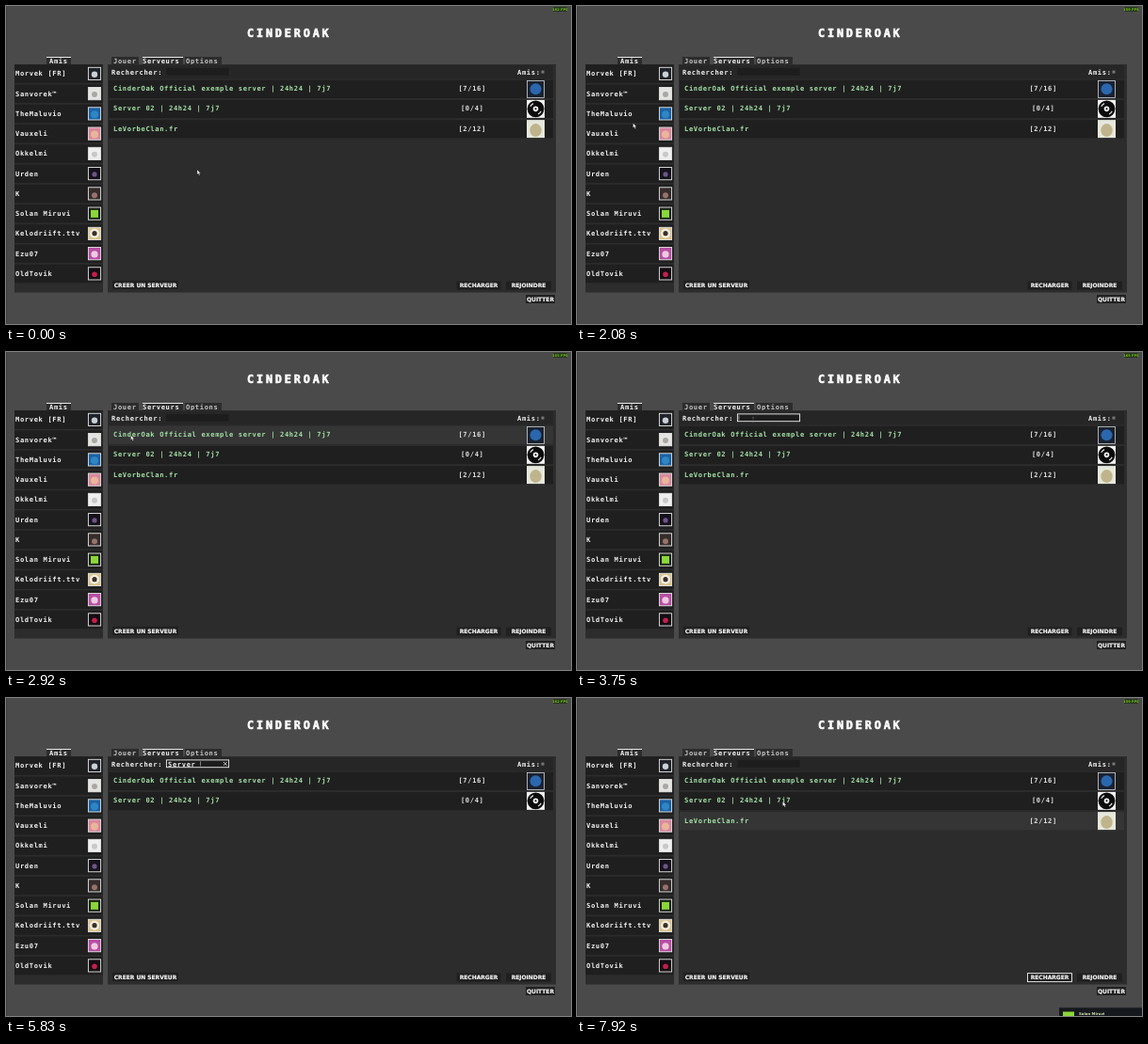
Recreate the animation shown at these times as an HTML page. Size 600 by 338 pixels, loop 8000 ms.

```html
<!DOCTYPE html>
<html lang="fr">
<head>
<meta charset="utf-8">
<title>Liste des serveurs</title>
<style>
html, body { margin: 0; width: 600px; height: 338px; overflow: hidden; background: #4a4a4a; }
svg { display: block; }
text { white-space: pre; }
.mono { font-family: "DejaVu Sans Mono", monospace; font-weight: bold; }
.wide { font-family: "DejaVu Sans", sans-serif; font-weight: bold; }
</style>
</head>
<body>
<svg id="stage" width="600" height="338" viewBox="0 0 600 338"></svg>
<script>
const LOOP = 8000;
const STEP = 4.92;      // advance of one character in the small type
const PITCH = 21.25;    // distance between list rows
const ROW = '#1f1f1f', ROW_HOVER = '#353535';
const stage = document.getElementById('stage');

function add(parent, tag, attrs, content) {
  const el = document.createElementNS('http://www.w3.org/2000/svg', tag);
  for (const key in attrs) el.setAttribute(key, attrs[key]);
  if (content !== undefined) el.textContent = content;
  parent.appendChild(el);
  return el;
}
const group = (parent = stage) => add(parent, 'g', {});
const rect = (p, x, y, width, height, fill, more) =>
  add(p, 'rect', { x, y, width, height, fill, ...more });
const circle = (p, cx, cy, r, fill) => add(p, 'circle', { cx, cy, r, fill });

// Text is placed by the vertical centre of its capitals.
function label(p, x, y, content, fill = '#f2f2f2') {
  const size = 7.1;
  return add(p, 'text', {
    class: 'mono', x, y: y + size * 0.36, fill, 'font-size': size,
    'letter-spacing': STEP - size * 0.602
  }, content);
}

function button(x, y, w, name) {
  const box = rect(stage, x, y, w, 9, '#202020');
  add(stage, 'text', {
    class: 'wide', x: x + w / 2, y: y + 6.7, fill: '#f4f4f4', stroke: '#f4f4f4',
    'stroke-width': 0.2, 'font-size': 5.95, 'text-anchor': 'middle'
  }, name);
  return box;
}

function tab(x, w, name, textX, active) {
  rect(stage, x, 54, w, 8, '#2c2c2c');
  if (active) rect(stage, x, 54, w, 1, '#e8e8e8');
  label(stage, textX, 58.2, name, active ? '#f2f2f2' : '#c4c4c4');
}

function show(el, on) {
  el.setAttribute('visibility', on ? 'visible' : 'hidden');
}

// Page
rect(stage, 0, 0, 600, 338, '#4a4a4a');
rect(stage, 0, 0, 0.7, 338, '#3a3a3a');
add(stage, 'text', {
  class: 'mono', x: 256, y: 33.4, fill: '#fff', stroke: '#fff', 'stroke-width': 0.6,
  'font-size': 11.8, 'letter-spacing': 2.85
}, 'CINDEROAK');

rect(stage, 581.5, 1, 14, 5, '#25351a');
const fps = add(stage, 'text', {
  class: 'wide', x: 588.5, y: 4.9, fill: '#74c41c', 'font-size': 3.6, 'text-anchor': 'middle'
});

// Friends
tab(43, 26, 'Amis', 46, true);
rect(stage, 9, 62, 94, 242.5, '#2c2c2c');

// name, backdrop, figure colour, figure radius, figure offset
const friends = [
  ['Morvek [FR]', '#20242a', '#c9d0d6', 3.2, 1],
  ['Sanvorek™', '#e4e4e2', '#a9a7a4', 3, 1],
  ['TheMaluvio', '#1b62a4', '#2f86c4', 4, 1],
  ['Vauxeli', '#d8889e', '#e9b69a', 4, 1],
  ['Okkelmi', '#efefef', '#c8c8c8', 3, 1],
  ['Urden', '#15121b', '#6d5585', 2.6, 1],
  ['K', '#352d2c', '#96736c', 3, 2],
  ['Solan Miruvi', '#17200f', '#8bd63a', 0, 0],
  ['Kelodriift.ttv', '#dcc48a', '#f3efe6', 5, 0],
  ['Ezu07', '#b84ea4', '#efcbe0', 3.6, 1],
  ['OldTovik', '#140d13', '#c31f4b', 2.8, 1]
];

const friendRows = friends.map(([name, back, tone, r, dy], i) => {
  const y = 71.7 + i * PITCH;
  const box = rect(stage, 9, y - 9.5, 93.5, 19.6, ROW);
  label(stage, 10, y, name);
  rect(stage, 87.4, y - 6.4, 13.2, 13.2, back, { stroke: '#e6e6e6', 'stroke-width': 0.9 });
  if (r) circle(stage, 94, y + dy, r, tone);
  else rect(stage, 90, y - 3.6, 8, 8, tone);
  if (name.endsWith('.ttv')) circle(stage, 94, y, 2.6, '#3a3025');
  return { box, y };
});

// Server panel
tab(112, 29, 'Jouer', 114);
tab(145, 43, 'Serveurs', 145, true);
tab(190, 39, 'Options', 191);
rect(stage, 108, 62, 476, 242.5, '#2c2c2c');
rect(stage, 109, 63, 472, 14.5, '#262626');
label(stage, 112, 70, 'Rechercher:');
label(stage, 543, 70, 'Amis:');
rect(stage, 568.5, 68.6, 3, 3, '#777');

const field = rect(stage, 170.4, 65.9, 66.2, 7.8, '#1d1d1d', { 'stroke-width': 0.9 });
const query = label(stage, 172, 70, '');
const clear = add(stage, 'path', {
  d: 'M231 68l3.6 3.8M234.6 68l-3.6 3.8', stroke: '#e4e4e4', 'stroke-width': 0.8
});
const caret = rect(stage, 0, 67.4, 0.7, 5, '#b0b0b0');

function emblem(g) {
  rect(g, 553.5, -8.6, 18, 18, '#1a2230', { stroke: '#cfd3d8', 'stroke-width': 0.8 });
  circle(g, 562.5, 0.2, 6, '#2b67ae');
}
function disc(g) {
  rect(g, 553, -9.4, 19, 19, '#f4f4f4');
  circle(g, 562.5, 0.1, 8.9, '#0b0b0b');
  add(g, 'path', {
    d: 'M556.8 -2.4A6.2 6.2 0 0 1 560 -5.6M568.2 2.6A6.2 6.2 0 0 1 565 5.8',
    stroke: '#e4e4e4', 'stroke-width': 1.2, fill: 'none'
  });
  circle(g, 562.5, 0.1, 2.8, '#f4f4f4');
  circle(g, 562.5, 0.1, 1, '#0b0b0b');
}
function portrait(g) {
  rect(g, 553, -9.4, 19, 19, '#e6e8dc');
  add(g, 'ellipse', { cx: 562.5, cy: 1.6, rx: 6.2, ry: 7, fill: '#bfb48c' });
}

const servers = [
  ['CinderOak Official exemple server | 24h24 | 7j7', '[7/16]', emblem],
  ['Server 02 | 24h24 | 7j7', '[0/4]', disc],
  ['LeVorbeClan.fr', '[2/12]', portrait]
].map(([name, count, icon]) => {
  const g = group();
  const box = rect(g, 109, -9.3, 472, 19.2, ROW);
  label(g, 114, -0.4, name, '#a5e2a8');
  label(g, 495.2 - count.length * STEP / 2, -0.4, count, '#e2e2e2');
  icon(g);
  return { name: name.toLowerCase(), g, box };
});

button(113, 291.8, 70, 'CREER UN SERVEUR');
const reload = button(478.5, 292.6, 47, 'RECHARGER');
button(531, 292.6, 48, 'REJOINDRE');
button(552, 307, 31, 'QUITTER');

// Friend notification
const toast = group();
rect(toast, 512, 0, 88, 30, '#15181c');
rect(toast, 512, 0, 88, 0.5, '#30353b');
rect(toast, 516, 4.5, 12, 12, '#8bd63a');
add(toast, 'text', { class: 'wide', x: 533, y: 7.6, fill: '#d5e6b4', 'font-size': 3.9 }, 'Solan Miruvi');

// Pointers
const arrow = add(stage, 'path', {
  d: 'M0 0V5L1.2 4L2.1 6L3 5.6L2.2 3.7H3.7Z',
  fill: '#fff', stroke: '#222', 'stroke-width': 0.35
});
const beam = add(stage, 'path', {
  d: 'M-1 -2.6H1M0 -2.6V2.6M-1 2.6H1', stroke: '#6a6a6a', 'stroke-width': 0.5
});

// time, x, y
const path = [
  [0, 203, 174], [250, 150, 215], [520, 76, 270], [830, 60, 283],
  [1250, 57, 280], [1640, 60, 190], [1960, 59.5, 124.6], [2090, 59.5, 124.6],
  [2450, 72, 92], [2920, 132.5, 88.5], [3350, 187, 71], [6800, 187, 71],
  [7330, 487, 285.5], [7460, 500, 295], [7600, 498, 294], [7920, 218.5, 110],
  [8000, 208, 107]
];
const TYPED = 'Server 02';
const keys = [4170, 4330, 4500, 4830, 5080, 5330, 5580, 6170, 6420];
const FOCUS = 3540, HOVER = 7440, CLICK = 7500;
const LAG = 65;         // the row highlight trails the pointer

function pointerAt(t) {
  const i = Math.max(1, path.findIndex(p => p[0] > t));
  const [a, b] = [path[i - 1], path[i]];
  const u = (t - a[0]) / (b[0] - a[0]);
  const s = u * u * (3 - 2 * u);
  return [a[1] + (b[1] - a[1]) * s, a[2] + (b[2] - a[2]) * s];
}

function highlight(box, y, left, right, [px, py]) {
  const over = px > left && px < right && py > y - 9.4 && py < y + 10;
  box.setAttribute('fill', over ? ROW_HOVER : ROW);
}

function draw(t) {
  const active = t >= FOCUS && t < CLICK;
  const text = active ? TYPED.slice(0, keys.filter(k => k <= t).length) : '';
  query.textContent = text;
  field.setAttribute('stroke', active ? '#f0f0f0' : 'none');
  show(clear, text);
  show(caret, active && t % 1000 >= 500);
  caret.setAttribute('x', 171.6 + text.length * STEP);

  const trail = pointerAt(Math.max(0, t - LAG));
  for (const { box, y } of friendRows) highlight(box, y, 9, 102.5, trail);

  let row = 0;
  for (const { name, g, box } of servers) {
    const match = name.includes(text.toLowerCase());
    show(g, match);
    if (!match) continue;
    const y = 88 + PITCH * row++;
    g.setAttribute('transform', `translate(0 ${y})`);
    highlight(box, y, 109, 581, trail);
  }

  reload.setAttribute('stroke', t >= HOVER ? '#f0f0f0' : 'none');
  reload.setAttribute('stroke-width', 0.9);

  const [x, y] = pointerAt(t);
  const overField = x > 170 && x < 237 && y > 66 && y < 75;
  show(arrow, !overField);
  show(beam, overField && !text);
  arrow.setAttribute('transform', `translate(${x} ${y})`);
  beam.setAttribute('transform', `translate(${x} ${y + 1})`);

  show(toast, t >= 7740);
  toast.setAttribute('transform', `translate(0 ${338 - (t - 7740) * 0.05})`);

  const beat = Math.floor(t / 250);
  fps.textContent = 150 + (beat * 37 + 12) % 23 + ' FPS';
}

function tick() {
  draw(performance.now() % LOOP);
  requestAnimationFrame(tick);
}
tick();
</script>
</body>
</html>
```
